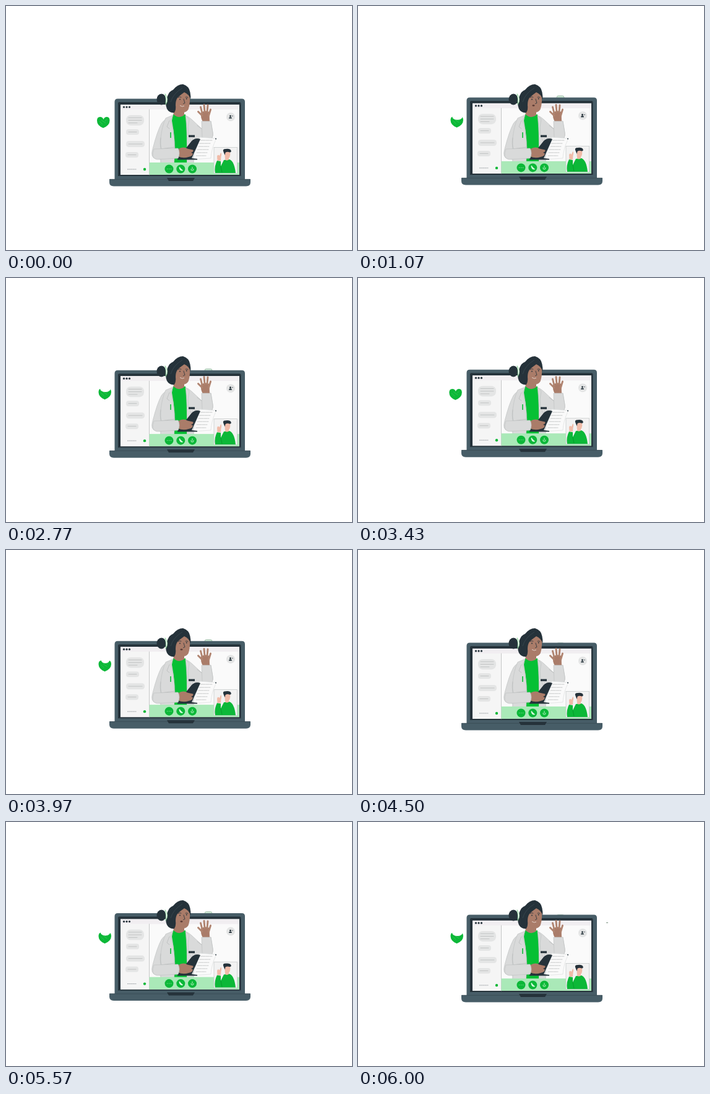
An HTML page that plays this animation: 559 px wide and 396 px high, repeating every 6.06 s.

```html
<!DOCTYPE html>
<html lang="en">
<head>
<meta charset="utf-8">
<title>Video consultation</title>
<style>
html, body { margin: 0; height: 100%; overflow: hidden; background: #fff; }
svg { display: block; width: 100vw; height: 100vh; }
.slate { fill: #475d67; }
.ink { fill: #25323a; }
.skin { fill: #aa7c69; }
.green { fill: #0cb838; }
.shirt { fill: #06c034; }
.coat { fill: #d9dada; stroke: #c0c3c3; stroke-width: .7; }
.line { fill: none; stroke: #b9bcbc; stroke-width: .8; stroke-linecap: round; }
.dark { fill: none; stroke: #25323a; stroke-width: .8; stroke-linecap: round; }
.finger { fill: none; stroke: #b08470; stroke-width: 2.9; stroke-linecap: round; }
.glyph { fill: none; stroke: #a5eab2; stroke-width: 1.1; stroke-linecap: round; }
</style>
</head>
<body>
<svg viewBox="0 0 559 396">
  <rect id="knob" x="321" width="12" height="6" rx="2.600" fill="#cfe9d6" stroke="#8fb09a" stroke-width=".7"/>

  <g class="bob">
    <path class="slate" d="M175.500 282V155.500q0-5 5-5H381q5 0 5 5V282Z"/>
    <path class="ink" d="M181 276V158q0-2 2-2H377q2.500 0 2.500 2V276Z"/>
    <rect x="185" y="160" width="192" height="114" fill="#fafafa"/>
    <rect x="185" y="160" width="192" height="8" fill="#f1eef1"/>
    <rect x="185" y="168" width="46" height="106" fill="#f5f5f5"/>
    <path class="line" d="M231.500 168V274"/>
    <g class="ink"><circle cx="190.500" cy="164" r="1.600"/><circle cx="195" cy="164" r="1.600"/><circle cx="199.500" cy="164" r="1.600"/></g>
    <g id="chat"></g>
    <path class="dark" d="M196.500 265H210" stroke-dasharray="1.500 1.600" opacity=".55"/>
    <circle class="green" cx="224" cy="265" r="2.200"/>
    <circle cx="363" cy="180" r="7" fill="#e4e5e5"/>
    <circle class="ink" cx="362.500" cy="178.600" r="1.400"/>
    <path class="ink" d="M360 182.500q0-2.300 2.500-2.300t2.500 2.300Z"/>
    <path class="dark" d="M365.500 178.500h1"/>
  </g>

  <g id="doctor">
    <path class="coat" d="M270 178Q257 182 251 191Q244 204 237 232Q233 246 242 248L250 249V255H303L302 214Q314 221 326 219Q336 216 334 205L331 187L317 188L317 200L301 185Q295 179 288 177Z"/>
    <path class="shirt" d="M270 176L290 176Q294 196 292 220V255H271.500Q275 220 268 186Z"/>
    <path class="coat" d="M270 177L266 186Q275 213 271.500 255H250V214Q252 195 258 182ZM290 177L296 184Q290 210 303 225V255H292.500Q293 200 290 177Z"/>
    <path class="line" d="M250 214Q248 224 251 232M250 232L273 229M317 200L309 194M264 186L260 196L264 199"/>
    <path d="M266 205V214" stroke="#0fb935" stroke-width="1.600"/>
    <path class="ink" d="M295 209.500h10v3.300h-10Z"/>
    <path class="skin" d="M271 163L288 168V177Q280 184 270.500 176Z"/>
    <path class="skin" d="M272 140Q284 131 296.500 139Q298.500 157 294.500 168Q289 176 278 170Q269 160 272 140Z"/>
    <ellipse class="ink" cx="251" cy="151.500" rx="7.500" ry="9"/>
    <path class="ink" d="M261 146Q264 138 270 136Q277 127 286 127Q296 130 297.500 140Q299 147 298 152Q296 143 288 140Q282 144 277 149Q274 153 274 161Q275 168 272 173Q264 174 260 167Q256 158 261 146Z"/>
    <path d="M266 156Q270 142 285 133" fill="none" stroke="#3d4c54" stroke-width=".7"/>
    <path d="M257 142.500Q264 151 258 160Q259 151 257 142.500Z" fill="#fff" stroke="#74c985" stroke-width=".7"/>
    <path class="dark" d="M278 148.500q3-2 5-.5M290 148q2-1 4 .5M287 151l2 6.500-2.500 1"/>
    <circle class="ink" cx="281" cy="151.500" r=".9"/><circle class="ink" cx="291.700" cy="150.500" r=".9"/>
    <path id="smile" d="M281 161.500q4 3 7 .5" fill="none" stroke="#e9d9d2" stroke-width=".9"/>
    <ellipse id="talk" cx="283.500" cy="161.500" rx="2" ry="1.300" fill="#573832"/>
    <path class="skin" d="M315 173Q322 168 328.500 172L329 188L318 188Q314 181 315 173Z"/>
    <path class="finger" d="M317 178L310.500 171.500M317 174L314.500 164M321 172L320 160.500M325 172L326 161M327.500 178L330.500 168"/>
    <path class="coat" d="M316 187L331 187L334 206Q335 217 326 219L317 214Z"/>
    <path d="M313 213L340 215Q332 230 331 247L302 249Z" fill="#fafafa" stroke="#dcdede" stroke-width=".7"/>
    <path class="line" d="M314 218h19M312 223h18M311 228h17M309 233h18M308 238h17M307 243h16" stroke-dasharray="8 1 5 1"/>
    <circle class="ink" cx="339" cy="215.500" r=".9"/>
    <path class="ink" d="M277 248L300 219Q306 213 314 216L300 247L309 248V249.500H277Z"/>
    <path class="skin" d="M277 233Q287 227 293 231.500L302 233.500Q304 236 299 238L302 239.500Q301 244 295 245Q286 248 278 244Z"/>
    <path class="coat" d="M239 232L278 231Q282 239 278 247L244 249Q233 247 239 232Z"/>
  </g>

  <g class="bob">
    <rect x="231.500" y="254" width="145.500" height="20" fill="#aae9b8"/>
    <g class="green"><circle cx="263.500" cy="264.500" r="7"/><circle cx="282.300" cy="264.500" r="7"/><circle cx="301" cy="264.500" r="7"/></g>
    <path class="glyph" d="M260.500 264.500h.1M263.500 264.500h.1M266.500 264.500h.1M301 261.500v3M299 264.500q0 2.500 2 2.500t2-2.500"/>
    <path d="M279.500 261.500q1.500-1 2 1l3 3q2 .5 1 2Q280 268 279.500 261.500Z" fill="#d9fae0"/>
    <rect x="336" y="229.500" width="37.500" height="42" fill="#f2f2f2" stroke="#c9cccc" stroke-width=".8"/>
    <path class="green" d="M338 271Q336 261 341 251L347 252L347 260L352 250L361 249Q369 252 371 271Z"/>
    <path d="M353 236Q358 233 362 237Q363 244 360 247V249.500Q356 252 354 249ZM341.500 251L341 244Q342 240 345 243L347 238Q349 239 347.500 245L347 251Z" fill="#f0bba8"/>
    <path class="ink" d="M351.500 237Q349 232 355 232Q362 231 363.500 234.500Q364.500 237.500 361.500 237.500Q357 236 354.500 238L353.500 242Z"/>
    <path d="M347 260L349 270" stroke="#078b27" stroke-width=".7"/>
    <path class="slate" d="M167 281H395V286Q395 292.500 388 292.500H174Q167 292.500 167 286Z"/>
    <path d="M167.500 281.300H394.500" stroke="#394b54" stroke-width=".8"/>
    <path class="ink" d="M260 279H305L302 284H263Z"/>
  </g>

  <g id="heart">
    <path class="green" d="M157 198Q147 194 147 186Q147 180 152 180Q156 180 157.500 184Q159 180 163 180Q167.500 180 167.500 186Q167.500 194 157 198Z"/>
    <path d="M151 187l5 5M154 185l7 5M160 187l3-3" stroke="#36cb55" stroke-width=".8"/>
  </g>
  <ellipse id="wipe" cx="160.500" cy="179.500" fill="#fff"/>
  <path id="dash" d="M401 163.500h3" stroke="#69806f" stroke-width=".9"/>
</svg>
<script>
const LOOP = 6060, CYCLE = LOOP / 4;
const byId = id => document.getElementById(id);
const clamp = v => Math.max(0, Math.min(1, v));
const show = (id, on) => byId(id).setAttribute('visibility', on ? 'visible' : 'hidden');
const shift = (el, x, y) => el.setAttribute('transform', `translate(${x} ${y})`);

// Chat bubbles: x, y, width, height, text rows
byId('chat').innerHTML = [[194, 177, 29, 17, 3], [194, 200, 21, 9, 1], [194, 219, 30, 10, 1], [193, 237, 21, 9, 1]]
  .map(([x, y, w, h, rows]) =>
    `<rect x="${x}" y="${y}" width="${w}" height="${h}" rx="${h / 2.3}" fill="#e4e5e5"/>` +
    Array.from({ length: rows }, (_, i) =>
      `<path class="line" d="M${x + 4} ${y + h * (i + 1) / (rows + 1)}h${w - 8 - (i === 2 ? 7 : 0)}"/>`).join('')).join('');

function draw(now) {
  const p = now % CYCLE / CYCLE;
  const dy = -1.65 * (1 - Math.cos(p * 2 * Math.PI));
  document.querySelectorAll('.bob').forEach(el => shift(el, 0, dy));

  const rise = Math.max(0, Math.sin(Math.PI * (p - .28) / .72));
  byId('knob').setAttribute('y', 151.5 - 6 * rise);

  // The heart drifts right, is worn away from above, then vanishes
  const drift = clamp((p - .25) / .1);
  const wear = clamp((p - .3) / .42);
  shift(byId('heart'), 2.5 * drift, -.7 * drift);
  byId('wipe').setAttribute('rx', 8.5 * wear);
  byId('wipe').setAttribute('ry', 5.5 * wear);
  show('heart', p < .966);

  const talking = p > .6 && p < .75;
  show('talk', talking);
  show('smile', !talking);
  show('dash', p > .95 && p < .966);
}

function tick(now) {
  draw(now);
  requestAnimationFrame(tick);
}
draw(0);
requestAnimationFrame(tick);
</script>
</body>
</html>
```
